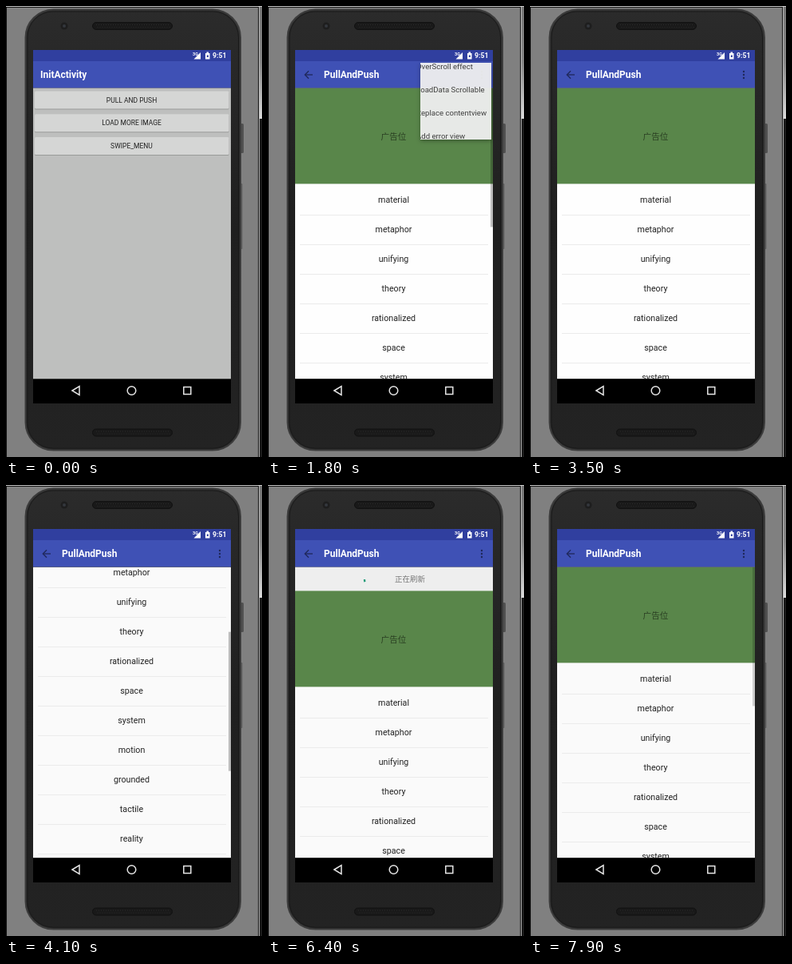
These frames come from a looping animation (321x564 px, 8 s). An HTML page with a canvas:

```html
<!DOCTYPE html>
<html lang="zh-CN">
<head>
<meta charset="utf-8">
<title>Pull and push</title>
<style>
html, body { margin: 0; width: 100%; height: 100%; overflow: hidden; background: #808080; }
canvas { display: block; width: 321px; height: 564px; }
</style>
</head>
<body>
<canvas id="stage"></canvas>
<script>
const W = 321, H = 564, LOOP = 8000, STEP = 100;
const SANS = 'Roboto, "Noto Sans CJK SC", "Noto Sans CJK", sans-serif';
const LEFT = 34, RIGHT = 282, TOP = 55, BAR_TOP = 69, BODY = 102.4, FOOT = 466.5, MID = 157.5;
const WIDE = RIGHT - LEFT, AD = 120, ROW = 37, THUMB = 174;
const WORDS = ('material metaphor unifying theory rationalized space system motion ' +
  'grounded tactile reality inspired study paper ink advanced magic').split(' ');
const MENU = ['OverScroll effect', 'LoadData Scrollable', 'Replace contentview',
  'Add error view', 'Add empty view', 'Add load view'];

// Keys are [time, value] pairs
const OFFSET = [[3500, 0], [3700, -30], [3900, -110], [4100, -170], [4300, -180], [4500, -140],
  [4800, -48], [5000, 0], [5300, 50], [5500, 62], [5700, 34], [5800, 30], [6700, 30],
  [6800, 24], [7000, 10], [7200, 3], [7400, 0]];
const BAR = [[1800, 1], [2200, 0], [3500, 0], [3600, 1], [5800, 1], [6200, 0], [6700, 0],
  [6800, 1], [7800, 1], [8000, 0.4]];
const ENTER_Y = [[700, 35], [800, 26], [900, 3], [1000, 0]];
const ENTER_A = [[700, 0], [800, 0.3], [900, 0.88], [1000, 1]];
const REVEAL = [[1700, 0], [1800, 0.3], [1900, 0.72], [2000, 0.92], [2100, 0.98], [2200, 1]];
const MENU_A = [[1700, 0], [1800, 0.93], [1900, 1], [3100, 1], [3200, 0.75], [3300, 0.35], [3400, 0]];

const scale = window.devicePixelRatio || 1;
const canvas = document.getElementById('stage');
const layer = document.createElement('canvas');
for (const c of [canvas, layer]) {
  c.width = W * scale;
  c.height = H * scale;
  c.getContext('2d').scale(scale, scale);
}
const front = canvas.getContext('2d');
const back = layer.getContext('2d');
let ctx = front;

function track(keys, t) {
  if (t <= keys[0][0]) return keys[0][1];
  for (let i = 1; i < keys.length; i++) {
    const [t0, a] = keys[i - 1], [t1, b] = keys[i];
    if (t <= t1) return a + (b - a) * (t - t0) / (t1 - t0);
  }
  return keys[keys.length - 1][1];
}

function rect(x, y, w, h, fill) {
  ctx.fillStyle = fill;
  ctx.fillRect(x, y, w, h);
}

function round(x, y, w, h, r, fill, stroke, line = 1) {
  ctx.beginPath();
  ctx.roundRect(x, y, w, h, r);
  if (fill) { ctx.fillStyle = fill; ctx.fill(); }
  if (stroke) { ctx.strokeStyle = stroke; ctx.lineWidth = line; ctx.stroke(); }
}

function dot(x, y, r, fill) {
  ctx.beginPath();
  ctx.arc(x, y, r, 0, 7);
  ctx.fillStyle = fill;
  ctx.fill();
}

function path(points, color, line, closed) {
  ctx.beginPath();
  points.forEach(([x, y]) => ctx.lineTo(x, y));
  if (closed) ctx.closePath();
  ctx.strokeStyle = color;
  ctx.lineWidth = line;
  ctx.stroke();
}

function text(str, x, y, size, color, align = 'center', weight = 400) {
  ctx.font = `${weight} ${size}px ${SANS}`;
  ctx.textAlign = align;
  ctx.textBaseline = 'alphabetic';
  ctx.fillStyle = color;
  ctx.fillText(str, x, y + size * 0.34);
}

function clipped(x, y, w, h, draw) {
  ctx.save();
  ctx.beginPath();
  ctx.rect(x, y, w, h);
  ctx.clip();
  draw();
  ctx.restore();
}

function vertical(y0, y1, ...colors) {
  const g = ctx.createLinearGradient(0, y0, 0, y1);
  colors.forEach((c, i) => g.addColorStop(i / (colors.length - 1), c));
  return g;
}

function grille(y) {
  round(108.5, y, 100, 9, 4.5, '#191919', '#111');
  for (let x = 113; x < 206; x += 3) {
    rect(x, y + 2.5, 1, 1, '#2c2c2c');
    rect(x + 1.5, y + 5.5, 1, 1, '#2c2c2c');
  }
}

function phone() {
  rect(0, 0, W, H, '#808080');
  rect(0, 0, W, 1, '#c8c8c8');
  rect(0, 1, 317, 1, '#111');
  rect(0, 1, 1, H, '#111');
  rect(316, 1, 1, H, '#181818');
  rect(317, 1, 1, H, '#b4b4b4');
  rect(318, 1, 3, 140, vertical(0, 141, '#777', '#888', '#ddd'));
  rect(318, 141, 3, H - 141, '#1b1b1b');
  round(294, 147, 4, 37, 1.5, '#505050');
  round(294, 222, 2.5, 82, 1, '#606060');
  round(24.5, 4.5, 269.5, 551, 35, vertical(4, 556, '#2b2b2b', '#1f1f1f', '#232323'), '#3c3c3c', 2);
  round(27, 7, 264.5, 546, 32, null, '#1b1b1b', 1);
  grille(20.5);
  grille(529);
  dot(73, 25, 4.5, '#1e1e1e');
  dot(73, 25, 2, '#33373d');
}

function statusBar() {
  rect(LEFT, TOP, WIDE, BAR_TOP - TOP, '#303f9f');
  text('3G', 234, 60, 5.5, '#fff', 'left', 700);
  ctx.beginPath();
  ctx.moveTo(235.5, 66.5);
  ctx.lineTo(244, 66.5);
  ctx.lineTo(244, 58);
  ctx.fillStyle = '#fff';
  ctx.fill();
  rect(250, 59, 5.5, 7.5, '#fff');
  rect(251.5, 57.5, 2.5, 2, '#fff');
  rect(251.8, 61.5, 2, 2.5, '#303f9f');
  text('9:51', 276.5, 62, 8.7, '#fff', 'right', 700);
}

function toolbar(title, x) {
  rect(LEFT, BAR_TOP, WIDE, BODY - BAR_TOP, '#3f51b5');
  text(title, x, 86.4, 12, '#fff', 'left', 700);
}

function navBar() {
  const c = '#e6e6e6';
  rect(LEFT, FOOT, WIDE, 497 - FOOT, '#000');
  path([[83, 481], [92, 475.5], [92, 486.5]], c, 1.5, true);
  ctx.beginPath();
  ctx.arc(157.5, 481, 5.3, 0, 7);
  ctx.stroke();
  ctx.strokeRect(222.8, 476.5, 9, 9);
}

function ripple(t, y) {
  clipped(36, y, 243.5, 22, () =>
    dot(187, y + 11, 21 + (t - 600) * 0.17, 'rgba(0,0,0,.035)'));
}

function home(t) {
  rect(LEFT, BODY, WIDE, FOOT - BODY, '#bebfbe');
  statusBar();
  toolbar('InitActivity', 43);
  ['PULL AND PUSH', 'LOAD MORE IMAGE', 'SWIPE_MENU'].forEach((label, i) => {
    const y = 106.5 + i * 28.8;
    round(36, y + 1, 243.5, 22, 1.5, '#999b99');
    round(36, y, 243.5, 22, 1.5, '#d5d6d5');
    if (i === 0 && t >= 600) ripple(t, y);
    text(label, MID, y + 11.2, 8.5, '#222');
  });
}

function refreshHeader(t, y) {
  rect(LEFT, BODY, WIDE, y, '#eee');
  const mid = BODY + y - 14.4;
  const label = t >= 5700 ? '正在刷新' : y < 30 ? '下拉刷新' : '松开刷新';
  text(label, 178, mid, 9.5, '#777');
  if (t < 5700) return;
  const p = (t - 6400) / 1300;
  const start = 2.85 + p * 6;
  const sweep = 0.3 + 4.2 * Math.sin(Math.PI * p) ** 2;
  ctx.beginPath();
  ctx.arc(132, mid, 11, start, start + sweep);
  ctx.strokeStyle = '#1a9c78';
  ctx.lineWidth = 2.3;
  ctx.stroke();
}

function list(t) {
  const y = track(OFFSET, t);
  clipped(LEFT, BODY, WIDE, FOOT - BODY, () => {
    rect(LEFT, BODY, WIDE, FOOT - BODY, t < 3600 ? '#fefefe' : '#fafafa');
    if (y > 0) refreshHeader(t, y);
    rect(LEFT, BODY + y, WIDE, AD, '#59864a');
    text('广告位', MID, 163 + y, 10.6, '#2b4023');
    WORDS.forEach((word, i) => {
      const top = BODY + AD + y + i * ROW;
      text(word, MID, top + 20.1, 10.7, '#222');
      rect(40, top + 38.6, 236, 1, '#ebebeb');
    });
    const top = BODY + (y > 0 ? y : -y * 0.478);
    rect(279, top, 3, THUMB, `rgba(0,0,0,${0.25 * track(BAR, t)})`);
  });
}

function pullScreen(t) {
  const ink = '#1f285a';
  list(t);
  toolbar('PullAndPush', 70);
  path([[56, 86], [46.5, 86]], ink, 1.3);
  path([[51, 81.3], [46.3, 86], [51, 90.7]], ink, 1.3);
  [82, 86, 90].forEach(y => dot(268, y, 1.2, ink));
}

function popup(t) {
  const alpha = track(MENU_A, t);
  if (!alpha) return;
  const rest = (1 - track(REVEAL, t)) / 0.7;
  const left = 152 + 39 * rest, bottom = 253 - 86 * rest;
  ctx.save();
  ctx.globalAlpha = alpha;
  ctx.shadowColor = 'rgba(0,0,0,.35)';
  ctx.shadowBlur = 5 * scale;
  ctx.shadowOffsetY = 2 * scale;
  rect(left, 71, 280 - left, bottom - 71, '#f5f5f5');
  ctx.shadowColor = 'transparent';
  clipped(left, 71, 280 - left, bottom - 71, () => {
    MENU.forEach((label, i) =>
      text(label, 161 + 25 * rest, 91 - 15 * rest + i * 28.9, 9.6, '#333', 'left'));
  });
  ctx.restore();
}

// The new screen is drawn apart so that it fades in as one layer
function enter(t) {
  ctx = back;
  ctx.clearRect(0, 0, W, H);
  pullScreen(t);
  ctx = front;
  ctx.globalAlpha = track(ENTER_A, t);
  ctx.drawImage(layer, 0, track(ENTER_Y, t), W, H);
  ctx.globalAlpha = 1;
}

function draw(t) {
  phone();
  if (t < 1000) {
    home(t);
    navBar();
    if (t >= 800) enter(t);
  } else {
    statusBar();
    pullScreen(t);
    navBar();
    popup(t);
  }
}

function tick() {
  const t = performance.now() % LOOP;
  draw(Math.floor(t / STEP) * STEP);
  requestAnimationFrame(tick);
}
tick();
</script>
</body>
</html>
```
